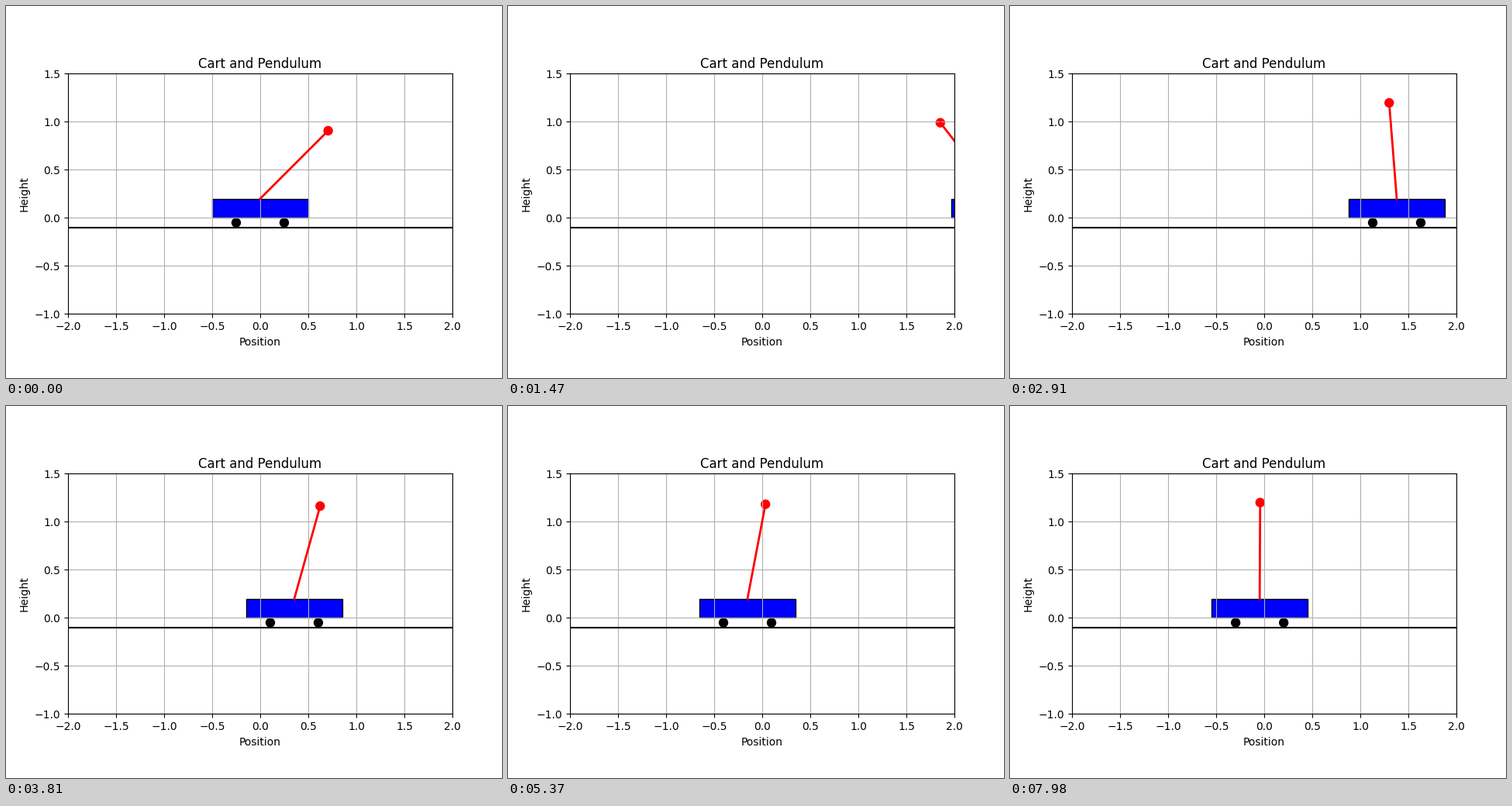
Write a matplotlib script that moves like this. It is 640 px wide and 480 px high and loops after 8 s.

```python
import numpy as np
import matplotlib.pyplot as plt
from matplotlib.animation import FuncAnimation
from matplotlib.patches import Circle, Rectangle

LOOP, TICK, STEP = 8000, 20, 30   # ms: loop, timer tick, time per pose
BODY_W, BODY_H, WHEEL_GAP, RADIUS, ROD = 1.0, 0.2, 0.25, 0.05, 1.0

# Key poses: time (s), cart position, rod angle (rad)
KEYS = np.array([(0, 0, np.pi / 4), (0.81, 1.371, -0.045),
                 (1.47, 2.467, -0.66), (2.43, 2.065, -0.425),
                 (3.24, 0.919, 0.12), (3.81, 0.355, 0.272),
                 (4.86, -0.097, 0.248), (6.63, -0.105, 0.048),
                 (7.98, -0.047, 0.005)])
END_SPEED = 0.037, -0.015


def spline_slopes(t, p, end):
    """Slopes of a smooth cubic spline that starts at rest."""
    h = np.diff(t)
    rate = np.diff(p, axis=0) / h[:, None]
    a, b = np.eye(len(t)), np.zeros_like(p)
    b[-1] = end
    for i in range(1, len(t) - 1):
        a[i, i - 1:i + 2] = h[i], 2 * (h[i - 1] + h[i]), h[i - 1]
        b[i] = 3 * (h[i] * rate[i - 1] + h[i - 1] * rate[i])
    return np.linalg.solve(a, b)


times, poses = KEYS[:, 0], KEYS[:, 1:]
slopes = spline_slopes(times, poses, END_SPEED)


def pose(s):
    i = np.clip(np.searchsorted(times, s, side="right") - 1, 0, len(times) - 2)
    h = times[i + 1] - times[i]
    u = (s - times[i]) / h
    w = u * u * (3 - 2 * u)
    return ((1 - w) * poses[i] + w * poses[i + 1]
            + h * u * (1 - u) * ((1 - u) * slopes[i] - u * slopes[i + 1]))


fig, ax = plt.subplots(figsize=(6.4, 4.8), dpi=100)
ax.set_xlim(-2, 2)
ax.set_ylim(-1, 1.5)
ax.set_aspect("equal")
ax.set_xlabel("Position")
ax.set_ylabel("Height")
ax.set_title("Cart and Pendulum", pad=5.3)
ax.grid(True)

ax.axhline(-0.1, color="black", lw=1.5)
body = ax.add_patch(Rectangle((0, 0), BODY_W, BODY_H, fc="blue", ec="black"))
wheels = [ax.add_patch(Circle((0, -RADIUS), RADIUS, fc="black"))
          for _ in range(2)]
bob = ax.add_patch(Circle((0, 0), RADIUS, fc="red"))
rod, = ax.plot([], [], color="red", lw=2)


def update(i):
    s = (i * TICK + TICK // 2) // STEP * STEP / 1000
    x, angle = pose(s)
    tip = x + ROD * np.sin(angle), BODY_H + ROD * np.cos(angle)
    body.set_x(x - BODY_W / 2)
    for wheel, side in zip(wheels, (-1, 1)):
        wheel.center = x + side * WHEEL_GAP, -RADIUS
    bob.center = tip
    rod.set_data([x, tip[0]], [BODY_H, tip[1]])
    return body, *wheels, bob, rod


anim = FuncAnimation(fig, update, frames=LOOP // TICK, interval=TICK,
                     repeat=True, repeat_delay=0, blit=False)
plt.show()
```
